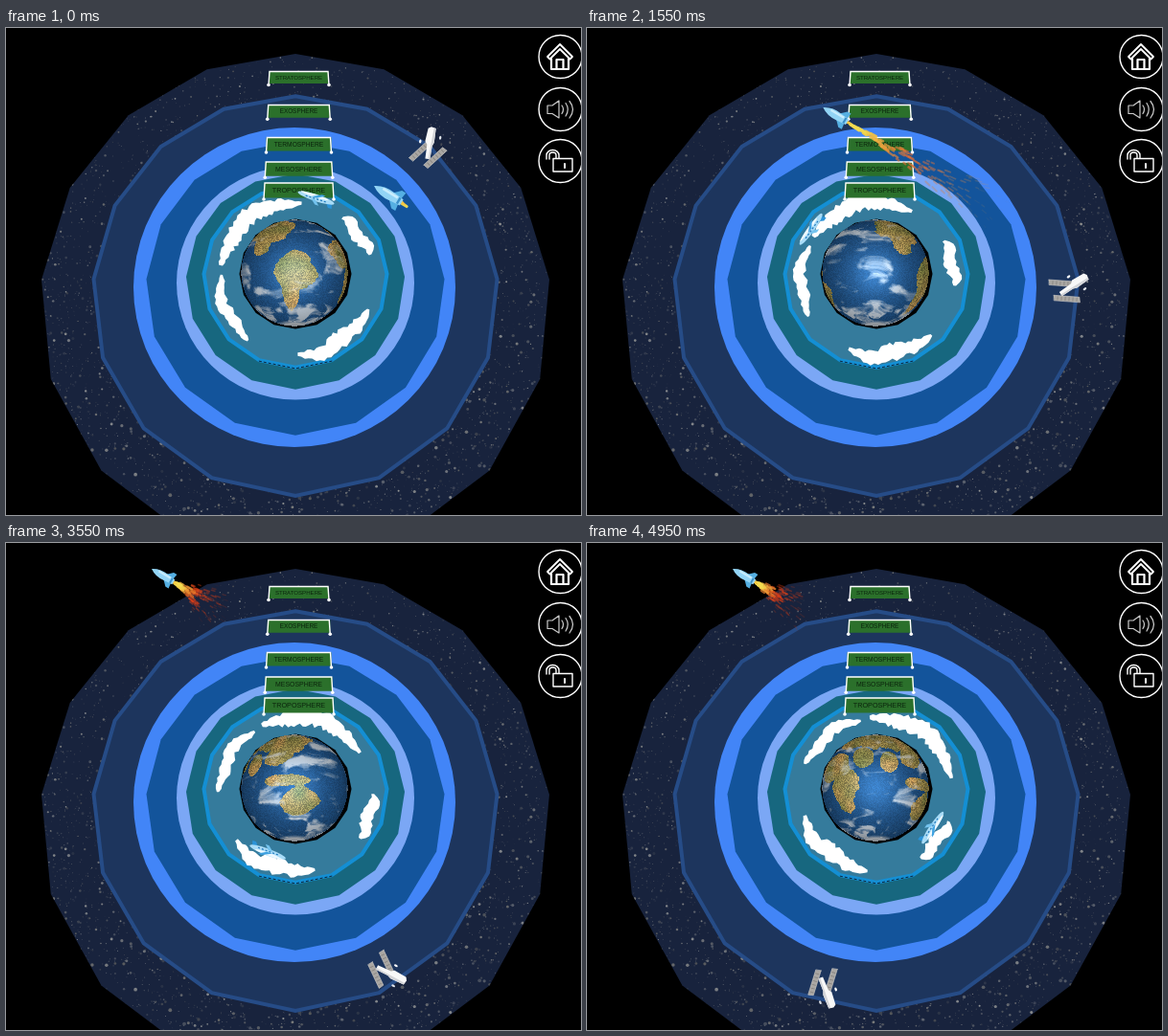
Write an HTML page with a canvas that moves like this. It is 600x509 px and loops after 5000 ms.

```html
<!DOCTYPE html>
<html lang="en">
<head>
<meta charset="utf-8">
<title>Layers of the atmosphere</title>
<style>
html, body { margin: 0; height: 100%; overflow: hidden; background: #000; }
canvas { display: block; }
</style>
</head>
<body>
<canvas id="stage" width="600" height="509"></canvas>
<script>
const W = 600, H = 509, LOOP = 5000, STEP = 50, RAD = Math.PI / 180;
const ctx = document.getElementById('stage').getContext('2d');

const rnd = n => { const s = Math.sin(n * 127.1 + 3.7) * 43758.5453; return s - Math.floor(s); };
const lerp = (a, b, u) => a + (b - a) * u;
const clamp = x => Math.max(0, Math.min(1, x));

function layer(w, h) {
  const c = document.createElement('canvas');
  c.width = w; c.height = h;
  return c.getContext('2d');
}

function poly(g, points, fill, stroke, width = 1) {
  g.beginPath();
  points.forEach(([x, y]) => g.lineTo(x, y));
  g.closePath();
  if (fill) { g.fillStyle = fill; g.fill(); }
  if (stroke) { g.strokeStyle = stroke; g.lineWidth = width; g.stroke(); }
}

function oval(g, x, y, rx, ry, fill) {
  g.beginPath();
  g.ellipse(x, y, rx, ry, 0, 0, 7);
  g.fillStyle = fill;
  g.fill();
}

// A 16-sided ring; `lean` sets its perspective
function ring(r, cy, lean = 0.0004) {
  return Array.from({ length: 16 }, (_, i) => {
    const a = i * 22.5 * RAD, d = 1 + lean * r * Math.cos(a);
    return [302 + r * Math.sin(a) / d, cy - 0.985 * r * Math.cos(a) / d];
  });
}

// ---------- Fixed scenery ----------
function drawSky(g) {
  g.fillStyle = '#000';
  g.fillRect(0, 0, W, H);
  g.save();
  poly(g, ring(265, 263), '#18233d');
  g.clip();
  for (let i = 0; i < 6500; i++) {
    const x = 30 + rnd(i) * 545, y = 20 + 489 * Math.pow(rnd(i + 7000), 0.85);
    const size = 0.45 + Math.pow(rnd(i + 14000), 5) * (0.6 + y / 550);
    const light = 95 + rnd(i + 21000) * 90;
    oval(g, x, y, size, size, `rgba(${light},${light},${light * 0.97},${0.15 + 0.65 * rnd(i + 28000)})`);
  }
  g.restore();
  poly(g, ring(210.5, 262.5), '#1d355d', '#264c87', 4);
  oval(g, 301, 271, 168, 167, '#4285f7');
  poly(g, ring(155.5, 262.5), '#13549b');
  oval(g, 302, 266.5, 124, 122, '#7ba7f5');
  poly(g, ring(114, 260), '#17677f');
  poly(g, ring(95.5, 257), '#357b9c', '#148fd4', 4);
  g.setLineDash([3, 2]);
  g.strokeStyle = '#0b2740';
  g.lineWidth = 1;
  g.beginPath();
  ring(96.5, 257).slice(7, 10).forEach(([x, y]) => g.lineTo(x, y));
  g.stroke();
  g.setLineDash([]);
}

function drawLabels(g) {
  const tops = [45.5, 80.5, 114.5, 140, 162];
  g.textAlign = 'center';
  g.textBaseline = 'middle';
  g.lineWidth = 1.4;
  ['STRATOSPHERE', 'EXOSPHERE', 'TERMOSPHERE', 'MESOSPHERE', 'TROPOSPHERE'].forEach((text, i) => {
    const w = 63 + 2.5 * i, h = 14 + 0.75 * i, x = 305.5 - w / 2, y = tops[i];
    g.fillStyle = '#2b702b';
    g.fillRect(x, y, w, h - 1.5);
    g.strokeStyle = '#fff';
    g.beginPath();
    g.moveTo(x, y + h);
    g.lineTo(x + 1, y);
    g.lineTo(x + w - 1, y);
    g.lineTo(x + w, y + h);
    g.stroke();
    for (const dx of [0, w]) oval(g, x + dx, y + h, 1.8, 1.8, '#fff');
    g.fillStyle = '#0b240d';
    g.font = `${6.1 + 0.28 * i}px "Liberation Sans", Arial, sans-serif`;
    g.fillText(text, x + w / 2, y + h / 2 - 0.5);
  });
}

function drawButtons(g) {
  g.lineJoin = g.lineCap = 'round';
  const line = (d, width, color = '#fff') => {
    g.lineWidth = width;
    g.strokeStyle = color;
    g.stroke(new Path2D(d));
  };
  for (const y of [30, 85, 139]) {
    oval(g, 578.5, y, 22.5, 22.5, '#000');
    g.lineWidth = 1.4;
    g.strokeStyle = '#fff';
    g.stroke();
  }
  line('M565 30 L578 17 L591 30 L588.5 32.5 L578 22 L567.5 32.5 Z', 1.8);
  line('M569 32 V43 H587 V32 M574.5 43 V33 H581.5 V43', 2.2);
  line('M565 81 H570 L577 76 V94 L570 89.5 H565 Z', 1.2, '#ccc');
  line('M580 81 Q583 85 580 89.5 M584 78.5 Q588.5 85 584 92 M588 76.5 Q595 85 588 94', 1.2, '#ccc');
  line('M571 136.5 H591 V150 H571 Z M564 137 V133 A6.5 5.5 0 0 1 577 133 V136 M567 137 V133 A3.5 3 0 0 1 574 133 V136', 1.4);
  line('M583 142 V146', 2);
}

// ---------- Globe ----------
// Rough continents as ovals with noisy coasts: lon, lat, half width, half height
const LAND = [
  [-59, -8, 22, 18], [-65, -32, 10, 27], [-100, 48, 36, 22], [-103, 26, 13, 16], [8, 18, 27, 19],
  [25, -10, 17, 26], [20, 52, 30, 16], [95, 55, 66, 24], [46, 26, 14, 15], [78, 21, 10, 15],
  [110, 30, 17, 19], [134, -25, 22, 14], [118, -2, 24, 6]
];
const TW = 720, TH = 360, GLOBE = 56, SIZE = 2 * GLOBE;

// Value noise that wraps every `period` cells in x
function noise(x, y, period) {
  const xi = Math.floor(x), yi = Math.floor(y), fx = x - xi, fy = y - yi;
  const at = (i, j) => rnd((i % period) + j * 131 + period * 17);
  const sx = fx * fx * (3 - 2 * fx), sy = fy * fy * (3 - 2 * fy);
  return lerp(lerp(at(xi, yi), at(xi + 1, yi), sx), lerp(at(xi, yi + 1), at(xi + 1, yi + 1), sx), sy);
}
function fbm(x, y) {
  let sum = 0, amp = 0.5;
  for (let p = 12; p < 200; p *= 2, amp /= 2) sum += amp * noise(x * p, y * p * 0.8, p);
  return sum;
}

function makeWorld() {
  const data = new Uint8ClampedArray(TW * TH * 4), sea = [30, 76, 124];
  for (let y = 0; y < TH; y++) for (let x = 0; x < TW; x++) {
    const k = (y * TW + x) * 4, lat = 90 - y / 2, lon = x / 2 - 180, u = x / TW + 1, v = y / TH;
    const coast = fbm(u, v + 2) - 0.48, grain = rnd(k + 1), green = noise(u * 24, v * 12, 24);
    const isLand = LAND.some(([a, b, w, h]) => Math.hypot((lon - a) / w, (lat - b) / h) < 1 + coast);
    const land = [lerp(190, 120, green), lerp(146, 122, green), lerp(82, 62, green)];
    const swirl = fbm(u + 0.09 * noise(u * 20, v * 14, 20), v * 1.7 + 0.1 * noise(u * 16, v * 9, 16));
    const south = 0.14 * clamp((-35 - lat) / 20), ice = 0.85 * clamp((Math.abs(lat + 4) - 68) / 8);
    const cloud = Math.max(ice, 0.8 * clamp((swirl + south - (isLand ? 0.6 : 0.53)) / 0.19));
    for (let c = 0; c < 3; c++) {
      const base = isLand ? land[c] * (0.75 + 0.5 * grain) : sea[c] * (0.9 + 0.2 * grain);
      data[k + c] = lerp(base, 222, cloud);
    }
  }
  return data;
}

const world = makeWorld(), globe = layer(SIZE, SIZE), pixels = globe.createImageData(SIZE, SIZE);
const sphere = [];
for (let j = 0; j < SIZE; j++) for (let i = 0; i < SIZE; i++) {
  const x = (i + 0.5) / GLOBE - 1, y = 1 - (j + 0.5) / GLOBE, rr = x * x + y * y;
  if (rr > 0.985) continue;
  const z = Math.sqrt(1 - rr), tilt = -11 * RAD;
  const lat = Math.asin(y * Math.cos(tilt) + z * Math.sin(tilt)) / RAD;
  const lon = Math.atan2(x, z * Math.cos(tilt) - y * Math.sin(tilt)) / RAD;
  sphere.push({ k: (j * SIZE + i) * 4, row: Math.min(TH - 1, Math.floor((90 - lat) * 2)), lon,
    shade: 0.62 + 0.42 * z, glow: 75 * Math.exp(-rr * 5) });
}

function drawGlobe(t) {
  const centre = -60 - 0.048 * t;
  for (const p of sphere) {
    const col = Math.floor(((centre + p.lon + 900) % 360) * 2);
    const s = (p.row * TW + col) * 4;
    for (let c = 0; c < 3; c++) pixels.data[p.k + c] = world[s + c] * p.shade + p.glow * (0.4 + c * 0.3);
    pixels.data[p.k + 3] = 255;
  }
  globe.putImageData(pixels, 0, 0);
  poly(ctx, ring(58.5, 257, 0), '#000');
  ctx.drawImage(globe.canvas, 245, 200);
}

// ---------- Moving parts ----------
// [start angle, end angle, half thickness] at the start of the loop
const CLOUDS = [[-53, -18, 8], [23, 89, 9], [128, 183, 6.5], [190, 274, 9]];

function drawClouds(t) {
  CLOUDS.forEach(([from, to, thick], n) => {
    const outer = [], inner = [], steps = Math.round((to - from) / 2.5);
    for (let i = 0; i <= steps; i++) {
      const u = i / steps, a = (lerp(from, to, u) + 0.015 * t) * RAD, seed = n * 200 + i;
      const body = thick * (0.2 + 0.8 * Math.pow(Math.sin(Math.PI * u), 0.7));
      const mid = 80 + 2 * Math.sin(u * 9 + n);
      const at = r => [303 + r * Math.cos(a), 262 + r * Math.sin(a)];
      outer.push(at(mid + body * (0.6 + 0.6 * rnd(seed))));
      inner.unshift(at(mid - body * (0.6 + 0.6 * rnd(seed + 90))));
    }
    poly(ctx, outer.concat(inner), '#fff');
  });
}

function drawPlane(t) {
  const a = (-72 - 0.0505 * t + 6 * Math.sin(Math.PI * t / 3900)) * RAD;
  const r = 77 - 5.5 * Math.cos(a - 105 * RAD);
  ctx.save();
  ctx.translate(298 + r * Math.cos(a), 256 + r * Math.sin(a));
  ctx.rotate(a - Math.PI / 2);
  poly(ctx, [[-19, -6], [-15, -6], [-11, -1], [-17, 1]], '#2b93d8');
  oval(ctx, 0, 0, 20, 3.6, '#a9dcf7');
  oval(ctx, 2, 1.8, 15, 1.5, '#eef9ff');
  poly(ctx, [[5, 0], [-1, 0], [-9, 5], [-5, 5]], '#3ea2e2');
  poly(ctx, [[5, -2], [0, -2], [-5, -7], [-1, -7]], '#74c3ee');
  ctx.fillStyle = '#1f78bd';
  for (let x = -11; x < 13; x += 4) ctx.fillRect(x, -1.6, 2, 1.2);
  ctx.restore();
}

// The rocket gathers speed along a straight line, shrinks, then parks
const BACK = 31 * RAD, BX = Math.cos(BACK), BY = Math.sin(BACK);
function rocketAt(t) {
  const u = Math.pow(clamp(t / 2470), 1.12);
  return { x: lerp(384, 152, u), y: lerp(165, 27, u), scale: lerp(1.2, 0.95, u) };
}

function drawTrail(t) {
  const life = 1100, gap = 8;
  ctx.lineCap = 'round';
  for (let i = Math.max(0, Math.ceil((t - life) / gap)); i * gap <= t; i++) {
    const born = i * gap, age = (t - born) / life, { x, y, scale } = rocketAt(born);
    const along = 29 * scale + 58 * age * (0.6 + 0.6 * rnd(i));
    const side = (rnd(i + 700) - 0.5) * (2 + 42 * Math.pow(age, 1.3));
    const px = x + BX * along - BY * side, py = y + BY * along + BX * side;
    const len = (2 + 4 * rnd(i + 300)) * scale, bend = BACK + side * 0.02;
    const pale = clamp(1.6 - born / 1000), cool = clamp(age * 3 - 0.2);
    const green = lerp(220, lerp(62, 150, pale), cool), blue = lerp(80, lerp(22, 85, pale), cool);
    ctx.strokeStyle = `rgba(${lerp(245, 200, age)},${green},${blue},${0.95 * (1 - age)})`;
    ctx.lineWidth = (2.6 - 1.5 * age) * scale;
    ctx.beginPath();
    ctx.moveTo(px, py);
    ctx.lineTo(px + Math.cos(bend) * len, py + Math.sin(bend) * len);
    ctx.stroke();
  }
}

function drawRocket(t) {
  const { x, y, scale } = rocketAt(t);
  ctx.save();
  ctx.translate(x, y);
  ctx.rotate(BACK);
  ctx.scale(scale, scale);
  poly(ctx, [[27, -2], [33, 0], [27, 2]], '#f6c542');
  for (const side of [-1, 1]) {
    poly(ctx, [[17, 3 * side], [23, 9 * side], [27, 9 * side], [26, 2 * side]], '#55afe2');
  }
  ctx.fillStyle = '#92d4f5';
  ctx.fill(new Path2D('M0 0 Q8 -5.5 18 -4 L28 -3 V3 L18 4 Q8 5.5 0 0'));
  ctx.fillStyle = '#c9edfd';
  ctx.fillRect(8, -3, 15, 2.2);
  ctx.fillStyle = '#3b8fc8';
  ctx.fillRect(24, -3, 2, 6);
  ctx.restore();
}

function drawSatellite(t) {
  const a = (-43.7 + 0.03025 * t) * RAD, r = 196 + 7 * Math.sin(a);
  ctx.save();
  ctx.translate(302 + r * Math.cos(a), 264 + r * Math.sin(a));
  ctx.rotate(a);
  const panel = (x, y) => {
    poly(ctx, [[x - 14, y - 3], [x + 13, y - 2.5], [x + 14, y + 3], [x - 13, y + 2.5]], '#aaa7a3', '#c9c7c4', 0.6);
    ctx.fillStyle = '#85827f';
    for (let i = -10; i < 12; i += 4) ctx.fillRect(x + i, y - 2, 0.8, 4);
  };
  panel(-3, -8);
  ctx.save();
  ctx.rotate(-37 * RAD);
  poly(ctx, [[-5, -2], [10, -2.5], [13, -5], [27, -4], [29, -1], [28, 4], [13, 4.5], [9, 3], [-5, 3]], '#f8f8f8');
  poly(ctx, [[-5, 1], [28, 2], [28, 4], [13, 4.5], [9, 3], [-5, 3]], '#d5d6d9');
  oval(ctx, 12, -10, 2, 1.2, '#fff');
  oval(ctx, 19, 10, 2, 1.2, '#dfe3ea');
  ctx.restore();
  panel(3, 8);
  ctx.restore();
}

const sky = layer(W, H), overlay = layer(W, H);
drawSky(sky);
drawLabels(overlay);
drawButtons(overlay);

const start = performance.now();
function frame() {
  const t = Math.floor(((performance.now() - start) % LOOP) / STEP) * STEP;
  ctx.drawImage(sky.canvas, 0, 0);
  drawClouds(t);
  drawGlobe(t);
  ctx.drawImage(overlay.canvas, 0, 0);
  drawPlane(t);
  drawTrail(t);
  drawRocket(t);
  drawSatellite(t);
  requestAnimationFrame(frame);
}
frame();
</script>
</body>
</html>
```
